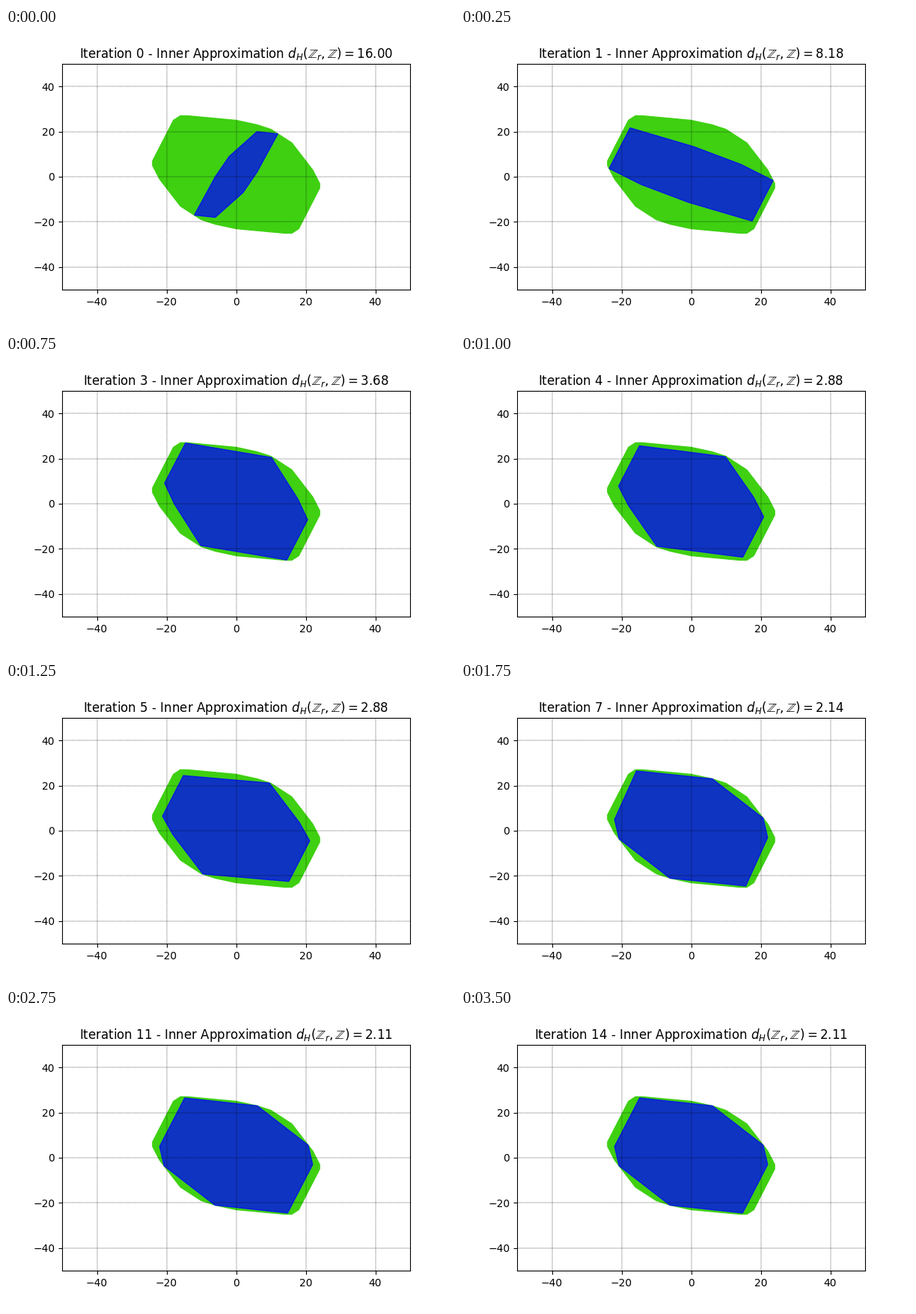
Animation, 600 px wide and 400 px high, one loop 3750 ms. Source, as a matplotlib script:

```python
import numpy as np
import matplotlib.pyplot as plt
from matplotlib.animation import FuncAnimation
from matplotlib.patches import Polygon

ITERATIONS = 15
GREEN = (0.245, 0.815, 0.065)
BLUE = (0, 0, 1)
CENTER = np.array([0, 1])

# Generators in clockwise order.
OUTER = [(0, 1), (3, 9), (1, 1), (1, 0), (7, -1),
         (3, -1), (2, -1), (3, -3), (3, -6), (1, -3)]

# Key generators of the reduced zonotope, blended between their iterations.
INNER = {
    0: [(3, 8.5), (2, 4.5), (4, 5.5), (3, -0.5)],
    1: [(3, 9), (9.15, -4.15), (6.8, -3.95), (4.6, -3.55)],
    3: [(3, 8.9), (12.35, -3.2), (3.8, -9.2), (1.4, -4.6)],
    5: [(3, 9), (12.35, -1.65), (4.3, -8.7), (1.5, -4.1)],
    7: [(3.15, 10.75), (10.9, -1.75), (7.3, -8.7), (0.65, -4.3)],
    10: [(3.6, 10.75), (10.45, -1.75), (7.3, -8.7), (0.65, -4.3)],
}
DISTANCE = {0: 16, 1: 8.18, 3: 3.68, 4: 2.88, 5: 2.88, 7: 2.14, 10: 2.11}


def zonotope(generators):
    """Walk the outline from the leftmost corner, there and back."""
    g = np.asarray(generators)
    edges = 2 * np.vstack([g, -g])
    return CENTER - g.sum(axis=0) + np.cumsum(edges, axis=0)


def blend(keys, i):
    """Linear interpolation of arrays keyed by iteration."""
    times = list(keys)
    values = np.array(list(keys.values()), dtype=float)
    pos = np.interp(i, times, range(len(times)))
    k = min(int(pos), len(times) - 2)
    return values[k] + (pos - k) * (values[k + 1] - values[k])


def distance(i):
    """The distance decays geometrically between its keys."""
    return np.exp(blend({t: np.log(d) for t, d in DISTANCE.items()}, i))


def add_zonotope(generators, color, alpha):
    return ax.add_patch(Polygon(zonotope(generators), color=color,
                                alpha=alpha, joinstyle="round"))


fig, ax = plt.subplots(figsize=(6, 4), dpi=100)
fig.subplots_adjust(left=0.125, right=0.9, bottom=0.125, top=0.88)
ax.set(xlim=(-50, 50), ylim=(-50, 50),
       xticks=range(-40, 41, 20), yticks=range(-40, 41, 20))
ax.grid(color="black", linestyle="--", linewidth=0.3)

add_zonotope(OUTER, GREEN, 1)
inner = add_zonotope(INNER[0], BLUE, 0.75)
title = ax.set_title("")


def update(i):
    inner.set_xy(zonotope(blend(INNER, i)))
    title.set_text(
        f"Iteration {i} - Inner Approximation "
        rf"$d_H(\mathbb{{Z}}_r,\mathbb{{Z}})={distance(i):.2f}$")
    return inner, title


anim = FuncAnimation(fig, update, frames=ITERATIONS, interval=250,
                     repeat=True, repeat_delay=0)
plt.show()
```
